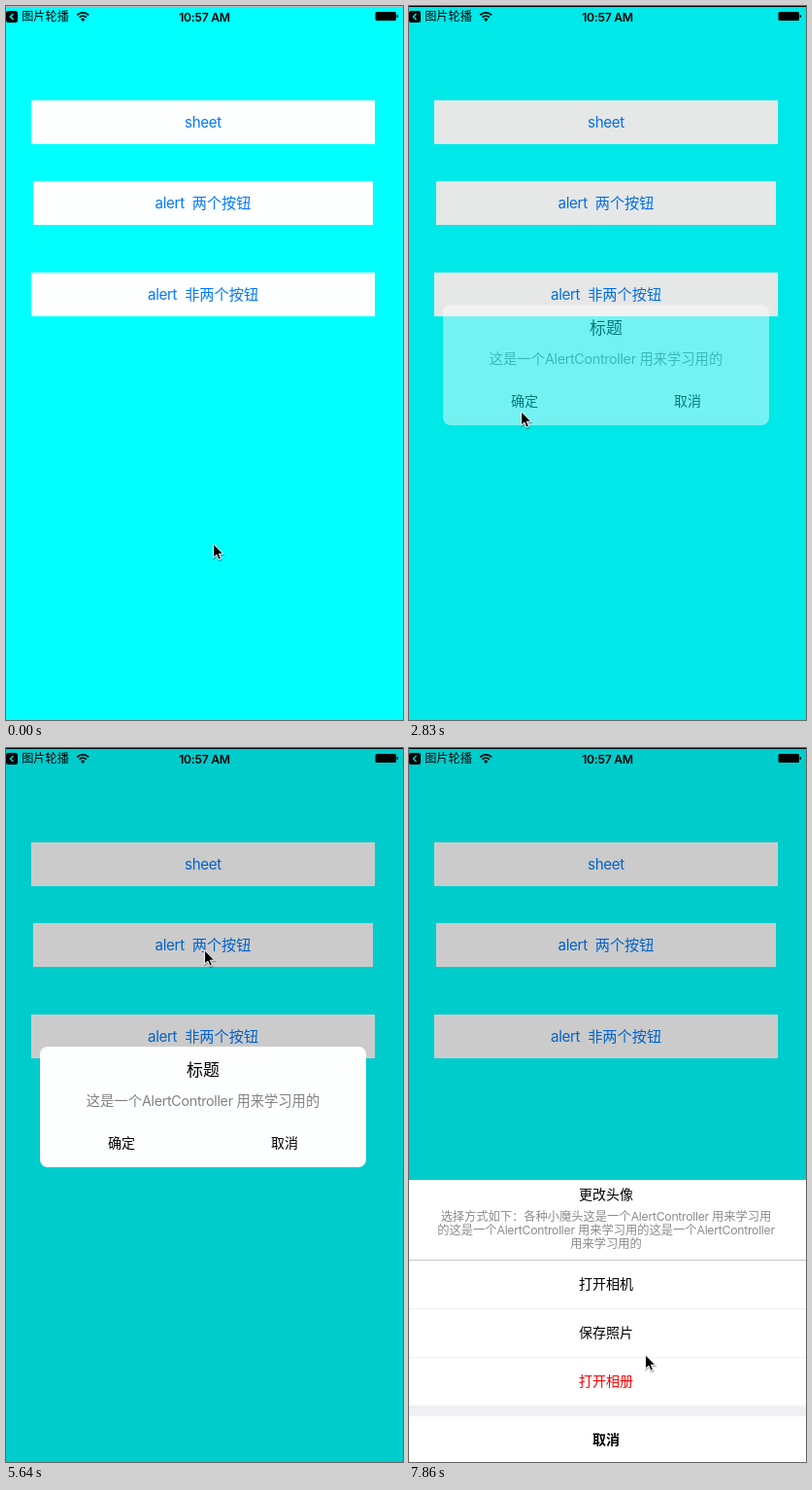
Write an HTML page that moves like this. It is 409 px wide and 734 px high and loops after 8 s.

```html
<!DOCTYPE html>
<html lang="zh">
<head>
<meta charset="utf-8">
<style>
  html, body { margin: 0; width: 100%; height: 100%; overflow: hidden; background: #0ff; }
  svg { display: block; width: 409px; height: 734px; }
  text { font-family: Inter, "Noto Sans CJK SC", "Noto Sans CJK", sans-serif; white-space: pre; }
  .latin { letter-spacing: -.022em; }
</style>
</head>
<body>
<svg id="stage" viewBox="0 0 409 734" xmlns="http://www.w3.org/2000/svg"></svg>
<script>
const LOOP = 8000, TICK = 148.1, FADE = 250;
const BLUE = '#007aff', GREY = '#828282', WHITE = '#fdfefe';
const stage = document.getElementById('stage');

function add(parent, tag, attrs = {}) {
  const el = document.createElementNS(stage.namespaceURI, tag);
  for (const key in attrs) el.setAttribute(key, attrs[key]);
  return parent.appendChild(el);
}

const rect = (parent, x, y, width, height, fill, rx = 0) =>
  add(parent, 'rect', { x, y, width, height, fill, rx });

// Text centred on (x, y); Latin runs are set a little tighter.
function label(parent, str, x, y, size, fill = '#000', weight = 400) {
  const el = add(parent, 'text', {
    x, y: y + size * 0.33, 'font-size': size, fill, 'font-weight': weight, 'text-anchor': 'middle'
  });
  for (const run of str.match(/[ -~]+|[^ -~]+/g)) {
    add(el, 'tspan', /[ -~]/.test(run) ? { class: 'latin' } : {}).textContent = run;
  }
}

// Page
rect(stage, 0, 0, 409, 734, '#0ff');
const topLine = rect(stage, 0, 0, 409, 1, '#b4b4b4');

function button(x, y, str) {
  rect(stage, x, y, 406 - 2 * x, 45, WHITE);
  label(stage, str, 203, y + 23, 15.2, BLUE);
}
button(26, 97, 'sheet');
button(28, 180, 'alert  两个按钮');
button(26, 274, 'alert  非两个按钮');

// Status bar
rect(stage, 0, 5, 12, 12, '#000', 2.5);
add(stage, 'path', { d: 'M7.5 8 4.5 11l3 3', fill: 'none', stroke: '#0ff', 'stroke-width': 1.5 });
label(stage, '图片轮播', 40.5, 11, 12.2);
add(stage, 'path', {
  d: 'M73.3 9.3a8.4 8.4 0 0 1 11.8 0M75.6 11.6a5.1 5.1 0 0 1 7.2 0',
  fill: 'none', stroke: '#000', 'stroke-width': 1.8
});
add(stage, 'path', { d: 'M79.2 16l-2.2-2.3a3.1 3.1 0 0 1 4.4 0z' });
label(stage, '10:57 AM', 204.5, 11.5, 12.2, '#000', 600);
rect(stage, 380.5, 6, 21.5, 9, '#000', 1.5);
rect(stage, 402.6, 9, 1.4, 3, '#000', 0.7);

// Overlays
const dim = rect(stage, 0, 0, 409, 734, '#000');

// Alert centred on y = 369, its buttons sharing the width evenly.
function alertBox(height, lines, firstLine, buttons) {
  const g = add(stage, 'g');
  const top = 369 - height / 2;
  rect(g, 35, top, 336, height, WHITE, 8);
  label(g, '标题', 203, top + 24, 17);
  lines.forEach((str, i) => label(g, str, 203, firstLine + i * 16.5, 14.3, GREY));
  buttons.forEach((str, i) =>
    label(g, str, 35 + 336 * (i + 0.5) / buttons.length, top + height - 25, 14));
  return g;
}

const pairAlert = alertBox(124, ['这是一个AlertController 用来学习用的'], 363, ['确定', '取消']);
const longAlert = alertBox(158,
  ['这是一个AlertController 用来学习用的这是一', '个AlertController 用来学习用的这是一个Aler…'], 355,
  ['确定']);

const sheet = add(stage, 'g');
rect(sheet, 0, 444, 409, 290, '#fff');
label(sheet, '更改头像', 203, 459.5, 14);
['选择方式如下：各种小魔头这是一个AlertController 用来学习用',
 '的这是一个AlertController 用来学习用的这是一个AlertController',
 '用来学习用的'].forEach((str, i) => label(sheet, str, 203, 482 + i * 14, 12.25, '#8c8c8c'));
['打开相机', '保存照片', '打开相册'].forEach((str, i) => {
  rect(sheet, 0, 526 + i * 50, 409, 1, i ? '#efeff1' : '#c8c8c8');
  label(sheet, str, 203, 551.5 + i * 50, 14, i === 2 ? '#f00' : '#000');
});
rect(sheet, 0, 676, 409, 11, '#efeff4');
label(sheet, '取消', 203, 711.5, 14, '#000', 600);

const cursor = add(stage, 'g');
const arrow = 'M.6 .9v14.2l3.3-3 2.1 5.1 2.5-1-2.1-5h4.4z';
add(cursor, 'path', { d: arrow, transform: 'translate(.4 1.3)', opacity: 0.25, stroke: '#000', 'stroke-width': 1.5 });
add(cursor, 'path', { d: arrow, stroke: '#fff' });

// Pointer glides: leave at one tick, arrive at another
const glides = [
  { leave: 1, arrive: 6, to: [203, 212] },
  { leave: 9, arrive: 12, to: [232, 414] },
  { leave: 12, arrive: 17, to: [115, 416] },
  { leave: 19, arrive: 21, to: [182, 299] },
  { leave: 22, arrive: 23, to: [188, 299] },
  { leave: 27, arrive: 30, to: [215, 438] },
  { leave: 32, arrive: 35, to: [204, 207] },
  { leave: 38, arrive: 42, to: [285, 412] },
  { leave: 43, arrive: 47, to: [197, 124] },
  { leave: 48, arrive: 52, to: [247, 578] },
  { leave: 52, arrive: 53, to: [243, 623] }
];

const clamp = k => Math.max(0, Math.min(1, k));
const smooth = k => k * k * (3 - 2 * k);
const ramp = (t, from) => clamp((t - from) / FADE);
const shown = (t, from, to) => ramp(t, from) - ramp(t, to);

function pointer(tick) {
  let pos = [213, 552];
  for (const { leave, arrive, to } of glides) {
    const k = smooth(clamp((tick - leave) / (arrive - leave)));
    pos = pos.map((v, i) => v + (to[i] - v) * k);
  }
  return pos.map(Math.round);
}

// The picture is held for one tick at a time.
function draw(time) {
  const tick = Math.min(53, Math.floor((time + 4) / TICK));
  const t = tick * TICK;
  const pair = shown(t, 1050, 2679) + shown(t, 5340, 6235);
  const long = shown(t, 3497, 4590);
  const rise = ramp(t, 6959);
  dim.setAttribute('opacity', 0.2 * Math.max(pair, long, rise));
  pairAlert.setAttribute('opacity', pair);
  longAlert.setAttribute('opacity', long);
  sheet.setAttribute('transform', `translate(0 ${Math.round(290 * (1 - rise))})`);
  cursor.setAttribute('transform', `translate(${pointer(tick)})`);
  topLine.setAttribute('fill', tick < 16 ? '#b4b4b4' : '#000');
}

const start = performance.now();
function loop() {
  draw((performance.now() - start) % LOOP);
  requestAnimationFrame(loop);
}
draw(0);
requestAnimationFrame(loop);
</script>
</body>
</html>
```
